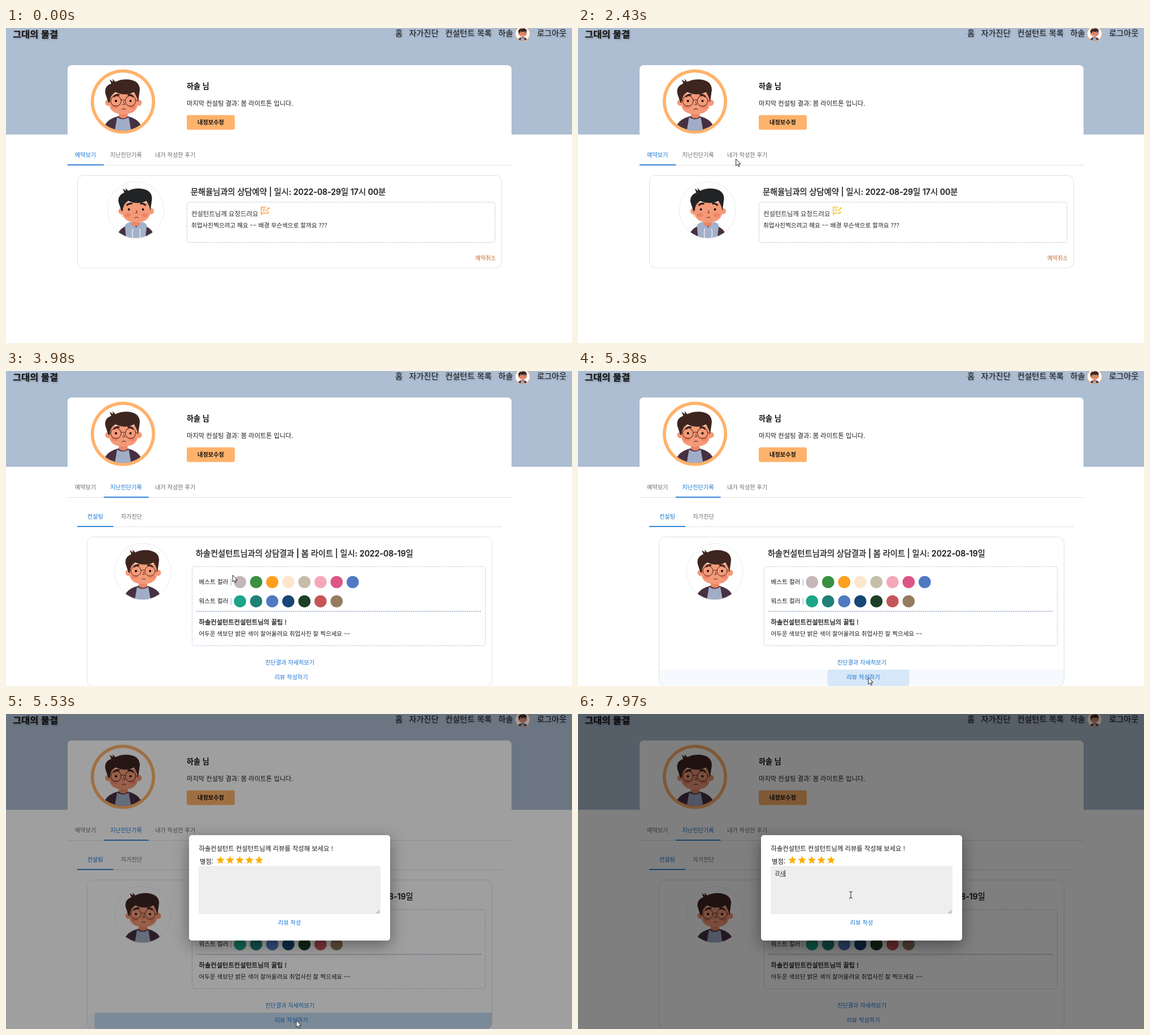
Animation of 1002x559 px, one loop 8 s. Source, as an HTML page:

```html
<!DOCTYPE html>
<html lang="ko">
<head>
<meta charset="utf-8">
<title>그대의 물결</title>
<style>
html, body { margin: 0; width: 100%; height: 100%; overflow: hidden; background: #fff; }
svg { display: block; width: 1002px; height: 559px; }
text { font-family: "Noto Sans CJK KR", "Noto Sans CJK", sans-serif; white-space: pre; }
.title { font-family: Inter, "Noto Sans CJK KR", "Noto Sans CJK", sans-serif; }
.title, .medium { stroke: #1c1c1c; stroke-width: .3; }
.brand { filter: drop-shadow(1.5px 1.5px 1.5px rgba(0, 0, 0, .4)); }
.nav { filter: drop-shadow(1.5px 1.5px 1.5px rgba(0, 0, 0, .25)); }
.dash { fill: none; stroke: #b3c1d6; stroke-dasharray: 2.2 1.6; }
.card { fill: none; stroke: #e0e0e0; }
#dialog rect:first-child { filter: drop-shadow(0 8px 14px rgba(0, 0, 0, .4)); }
</style>
</head>
<body>
<svg id="stage" viewBox="0 0 1002 559"></svg>
<script>
const BLUE = '#1976d2', GRAY = '#6b6b6b', INK = '#1c1c1c', PEACH = '#ffb26b';
const LOOP = 8000;

// Text placed by its vertical centre
const text = (x, y, size, str, fill = INK, weight = 400, extra = '') =>
  `<text x="${x}" y="${y + size * .37}" font-size="${size}" font-weight="${weight}" fill="${fill}" ${extra}>${str}</text>`;
const rect = (x, y, w, h, fill, extra = '') =>
  `<rect x="${x}" y="${y}" width="${w}" height="${h}" fill="${fill}" ${extra}/>`;
const box = (cls, x, y, w, h, r) =>
  `<rect class="${cls}" x="${x}" y="${y}" width="${w}" height="${h}" rx="${r}"/>`;
const mid = 'text-anchor="middle"';

function avatar(x, y, scale, hoodie) {
  const hair = hoodie ? '#222325' : '#3e2520', skin = '#f49a78';
  const extras = hoodie
    ? `<path d="M-17 50L-19 27Q-14 21 -8 21L1 31L10 21Q16 21 20 27L17 50Z" fill="#a3b1cb"/>
       <path d="M-5 33Q-7 42 -5 49M7 33Q9 42 7 49" stroke="#e8ecf3" stroke-width="1.5" fill="none"/>
       <circle cx="-23" cy="9" r="2.2" fill="none" stroke="#f2b33d"/>`
    : `<path d="M-14 50L-10 27Q0 34 10 27L14 50Z" fill="#a1adc7"/>`;
  const glasses = hoodie ? '' :
    `<g fill="none" stroke="#4b2a22"><circle cx="-12" cy="-1" r="9"/><circle cx="13" cy="-1" r="9"/>
     <path d="M-3 -2Q.5 -4 4 -2M-21 -2L-25 -1M22 -2L26 -1"/></g>`;
  return `<g transform="translate(${x} ${y}) scale(${scale})" clip-path="url(#round)">
    <circle r="50" fill="#fff"/>
    <path d="M-33 50C-32 33 -18 28 -7 25H7C18 28 32 33 33 50Z" fill="#473042"/>
    ${extras}<path d="M-7 15H8V26Q1 32 -7 26Z" fill="#e98765"/>
    <g fill="${skin}"><circle cx="-25" cy="2" r="5.5"/><circle cx="27" cy="2" r="5.5"/>
    <path d="M-24 -14H26V2Q25 22 1 22Q-23 22 -24 2Z"/></g>
    <g fill="#f08465"><ellipse cx="-14" cy="9" rx="6" ry="3.5"/><ellipse cx="16" cy="9" rx="6" ry="3.5"/></g>
    <path d="M-25 2L-30 -13Q-33 -26 -20 -31L-23 -38L-17 -34L-18 -39L-13 -34Q-3 -39 9 -38Q29 -36 29 -20L26 2Q25 -8 19 -16Q4 -9 -13 -16Q-22 -12 -23 2Z" fill="${hair}"/>
    <path d="M-16 -8Q-11 -13 -6 -11M8 -11Q13 -13 18 -8" stroke="${hair}" stroke-width="3" fill="none"/>
    <circle cx="-12" cy="-1" r="1.9"/><circle cx="13" cy="-1" r="1.9"/>${glasses}
    <path d="M1 0L3 5H-1M-2 14Q2 11 5 14" stroke="#4b2a22" fill="none"/></g>`;
}
const framed = (x, y, hoodie) => avatar(x, y, 1, hoodie) +
  `<circle cx="${x}" cy="${y}" r="50" fill="none" stroke="#e6e6e6" stroke-width=".8"/>`;

const dots = (y, colors) => colors.split(' ').map((c, i) =>
  `<circle cx="${414.3 + 28.5 * i}" cy="${y}" r="10.8" fill="#${c}"/>`).join('');

function star(x, y) {
  const points = Array.from({ length: 10 }, (_, i) => {
    const a = i * Math.PI / 5, r = i % 2 ? 3.4 : 7.6;
    return `${x + r * Math.sin(a)},${y - r * Math.cos(a)}`;
  });
  return `<polygon points="${points.join(' ')}" fill="#faaf00"/>`;
}

const header = `<g class="brand">${text(12, 11, 16.4, '그대의 물결', '#111', 700)}</g><g class="nav">` +
  [[689, '홈'], [713.5, '자가진단'], [777.5, '컨설턴트 목록'], [871.5, '하솔'], [940, '로그아웃']]
    .map(([x, s]) => text(x, 9, 14.2, s, '#111')).join('') +
  `</g><circle cx="914.5" cy="10" r="13.5" fill="${PEACH}"/>` + avatar(914.5, 10, .25);

const profile = rect(0, -20, 1002, 209, '#adbdd2') + rect(109, 66, 786, 150, '#fff', 'rx="7"') +
  `<circle cx="207" cy="130.5" r="57" fill="${PEACH}"/>` + avatar(207, 130.5, 1.03) +
  text(320, 103.5, 13.1, '하솔 님', '#111', 700) +
  text(320, 133.5, 11.3, '마지막 컨설팅 결과: 봄 라이트톤 입니다.') +
  rect(320, 154.5, 85, 26, PEACH, 'rx="3"') +
  text(362.5, 167.5, 10.2, '내정보수정', '#111', 700, mid) +
  rect(109, 243, 786, 1, '#e2e2e2');

const booking = box('card', 126.5, 261.5, 751, 164.5, 11) + framed(229.5, 323, true) +
  text(327, 290.5, 14.25, '문해율님과의 상담예약 | 일시: 2022-08-29일 17시 00분', INK, 500, 'class="title"') +
  box('dash', 320.5, 309, 545.5, 71.5, 4) +
  text(328, 329.3, 11.4, '컨설턴트님께 요청드려요', '#333') +
  text(328, 350.5, 10.65, '취업사진찍으려고 해요 ~~ 배경 무슨색으로 할까요 ???') +
  `<path id="note" fill="none" stroke-width="1.5" d="M460 318H452V331L454.500 328.500H464V325M454.500 321.500H459M454.500 324.500H458M460 325L466 318.500M463.500 318.500L466.500 321"/>` +
  text(831, 408.5, 9.8, '예약취소', '#c8692b') +
  `<path id="cardHover" d="M127 392V273Q127 262 138 262H866Q877 262 877 273V392Z"/>`;

const record = text(144, 277, 10.2, '컨설팅', BLUE) + text(203.5, 277, 10.2, '자가진단', GRAY) +
  rect(126, 295, 752, 1, '#e2e2e2') + rect(126, 294, 64, 1.7, BLUE) +
  `<g clip-path="url(#inCard)"><rect id="row" x="144" width="717" height="28" fill="${BLUE}" opacity=".04"/>
   <g clip-path="url(#inRow)"><circle id="rowRipple" cx="514" cy="563" fill="${BLUE}"/></g></g>` +
  box('card', 143.5, 313.5, 717, 265, 11) + framed(242, 375) +
  text(336, 342.5, 14.25, '하솔컨설턴트님과의 상담결과 | 봄 라이트 | 일시: 2022-08-19일', INK, 500, 'class="title"') +
  box('dash', 329.5, 366, 519, 140.5, 4) +
  text(341.5, 393, 10.7, '베스트 컬러 <tspan fill="#5f86b8">|</tspan>') +
  dots(393.5, 'c4b7b7 3a8f41 ff9f1f fde6cb c5bfaa f5a7b8 dd5585 5079c2') +
  text(341.5, 427.5, 10.7, '워스트 컬러 <tspan fill="#5f86b8">|</tspan>') +
  dots(427.7, '1ba687 1f8078 5079c2 164777 1c3f27 c55558 957b5f') +
  `<path class="dash" d="M337 445.500H841" style="stroke:#94a6c4;stroke-width:1.4"/>` +
  text(341.5, 465, 11.3, '하솔컨설턴트컨설턴트님의 꿀팁 !', INK, 500, 'class="medium"') +
  text(341.5, 485.3, 10.55, '어두운 색보단 밝은 색이 잘어울려요 취업사진 잘 찍으세요 ~~') +
  text(502.5, 536.5, 10.2, '진단결과 자세히보기', BLUE, 400, mid) +
  text(505, 562.5, 10.2, '리뷰 작성하기', BLUE, 400, mid);

const dialog = rect(324, 215, 356, 187, '#fff', 'rx="5"') +
  text(341.5, 238.8, 11.3, '하솔컨설턴트 컨설턴트님께 리뷰를 작성해 보세요 !') +
  text(343, 262, 11.4, '별점:') +
  [0, 1, 2, 3, 4].map(i => star(379.6 + 17.1 * i, 259.5)).join('') +
  rect(341, 269.5, 322, 85.5, '#eee', 'rx="3"') +
  `<path d="M655.500 354L661.500 348M659 354L661.500 351.500" stroke="#555" stroke-width=".8"/>` +
  text(502, 370.5, 10.2, '리뷰 작성', BLUE, 400, mid) +
  text(348.5, 282.5, 9.6, '', INK, 400, 'id="typed"') +
  rect(0, 287.5, 8.8, .8, INK, 'id="underline"') + rect(0, 277, 1, 12, '#111', 'id="caret"');

document.getElementById('stage').innerHTML = `<defs>
  <clipPath id="round"><circle r="50"/></clipPath>
  <clipPath id="inCard"><rect x="144" y="314" width="716.500" height="264" rx="11"/></clipPath>
  <clipPath id="inRow"><rect x="144" y="549" width="717" height="30"/></clipPath>
  <clipPath id="inTab"><rect x="173" y="209" width="79" height="34"/></clipPath></defs>
  <g id="page">${profile}
  <g clip-path="url(#inTab)"><circle id="tabRipple" cx="221" cy="226" fill="${BLUE}"/></g>
  ${text(122, 225, 10.2, '예약보기', GRAY, 400, 'id="tabA"')}
  ${text(184.5, 225, 10.2, '지난진단기록', GRAY, 400, 'id="tabB"')}
  ${text(264, 225, 10.2, '내가 작성한 후기', GRAY)}
  <rect id="indicator" y="242" height="1.700" fill="${BLUE}"/>
  <g id="booking">${booking}</g><g id="record">${record}</g></g>
  ${header}
  <rect id="backdrop" width="1002" height="559"/>
  <g id="dialog">${dialog}</g>
  <g id="cursor" stroke="#111" stroke-width=".9" fill="#fff" stroke-linejoin="round">
  <path id="arrow" d="M0 0V12L2.800 9.400L4.700 13.600L6.500 12.800L4.600 8.700H8.400Z"/>
  <path id="hand" d="M-1.500 1.200Q0 -.8 1.500 1.200V7Q3 6 4 7.400Q5.500 6.600 6.300 8Q8 7.600 8 9.500V13L6.500 18H-1.500L-5 11.500Q-5 9 -3 10L-1.500 11.500Z"/>
  <path id="beam" fill="none" d="M-3 -6Q0 -6 0 -4Q0 -6 3 -6M0 -4V4M-3 6Q0 6 0 4Q0 6 3 6"/></g>`;

const el = Object.fromEntries([...document.querySelectorAll('[id]')].map(e => [e.id, e]));
const set = (id, attrs) => { for (const k in attrs) el[id].setAttribute(k, attrs[k]); };
const show = (id, on) => set(id, { visibility: on ? 'visible' : 'hidden' });
const lerp = (a, b, p) => a + (b - a) * p;
const ease = (t, from, to) => {
  const p = Math.min(1, Math.max(0, (t - from) / (to - from)));
  return p * p * (3 - 2 * p);
};

// Pointer path: time, x, y
const path = [
  [70, 938, 536], [330, 706, 392], [600, 478, 246], [700, 448, 230], [860, 434, 268],
  [1880, 434, 268], [2640, 221, 219], [3530, 221, 219], [3980, 401, 362], [4310, 462, 463],
  [4380, 462, 463], [5180, 514, 544], [5600, 514, 544], [6090, 486, 325], [6300, 483, 321], [LOOP, 483, 321]
];
function pointer(t) {
  const i = Math.max(1, path.findIndex(k => k[0] > t));
  const [t0, x0, y0] = path[i - 1], [t1, x1, y1] = path[i], p = (t - t0) / (t1 - t0);
  return [lerp(x0, x1, p), lerp(y0, y1, p)];
}

function draw(t) {
  const scroll = Math.round(19 * ease(t, 3600, 3760));
  const second = t >= 2980;
  set('page', { transform: `translate(0 ${-scroll})` });
  set('booking', { display: second ? 'none' : 'inline' });
  set('record', { display: second ? 'inline' : 'none' });
  set('tabA', { fill: second ? GRAY : BLUE });
  set('tabB', { fill: second ? BLUE : GRAY });
  const slide = ease(t, 2980, 3240);
  set('indicator', { x: lerp(109, 173, slide), width: lerp(64, 79.5, slide) });
  set('tabRipple', { r: 58 * ease(t, 2900, 3150), opacity: .1 * (1 - ease(t, 3190, 3460)) });

  set('cardHover', { opacity: .04 * (ease(t, 330, 580) - ease(t, 1890, 2140)) });
  const tint = ease(t, 1000, 1330);
  set('note', { stroke: `rgb(245 ${lerp(160, 197, tint)} ${lerp(60, 24, tint)})` });

  const [x, y] = pointer(t);
  show('row', t < 5600 && y + scroll >= 523);
  set('row', { y: y + scroll < 549 ? 521 : 549 });
  set('rowRipple', {
    r: 371 * ease(t, 5310, 5560),
    opacity: lerp(.12, .22, ease(t, 5310, 5530)) * (1 - ease(t, 5560, 5950))
  });

  set('backdrop', { opacity: .5 * ease(t, 5420, 5584) });
  set('dialog', { opacity: ease(t, 5420, 5520) });
  const typed = t < 7580 ? '' : t < 7640 ? 'ㄱ' : t < 7710 ? '가' : t < 7970 ? '감' : '감사';
  const end = 348.2 + 8.83 * typed.length;
  el.typed.textContent = typed;
  set('underline', { x: end - 8.8 });
  set('caret', { x: end });
  show('underline', typed);
  show('caret', t >= 6160 && t < 6770 || t >= 7300);

  const beam = t > 5600 && y > 269 && y < 355;
  const hand = !second && y > 262 && y < 392 || t > 1880 && t < 3600 && y < 243 && x < 252;
  set('cursor', { transform: `translate(${x} ${y})` });
  show('arrow', t >= 70 && !beam && !hand);
  show('hand', t >= 70 && hand);
  show('beam', beam);
}

function tick() {
  draw(performance.now() % LOOP);
  requestAnimationFrame(tick);
}
tick();
</script>
</body>
</html>
```
